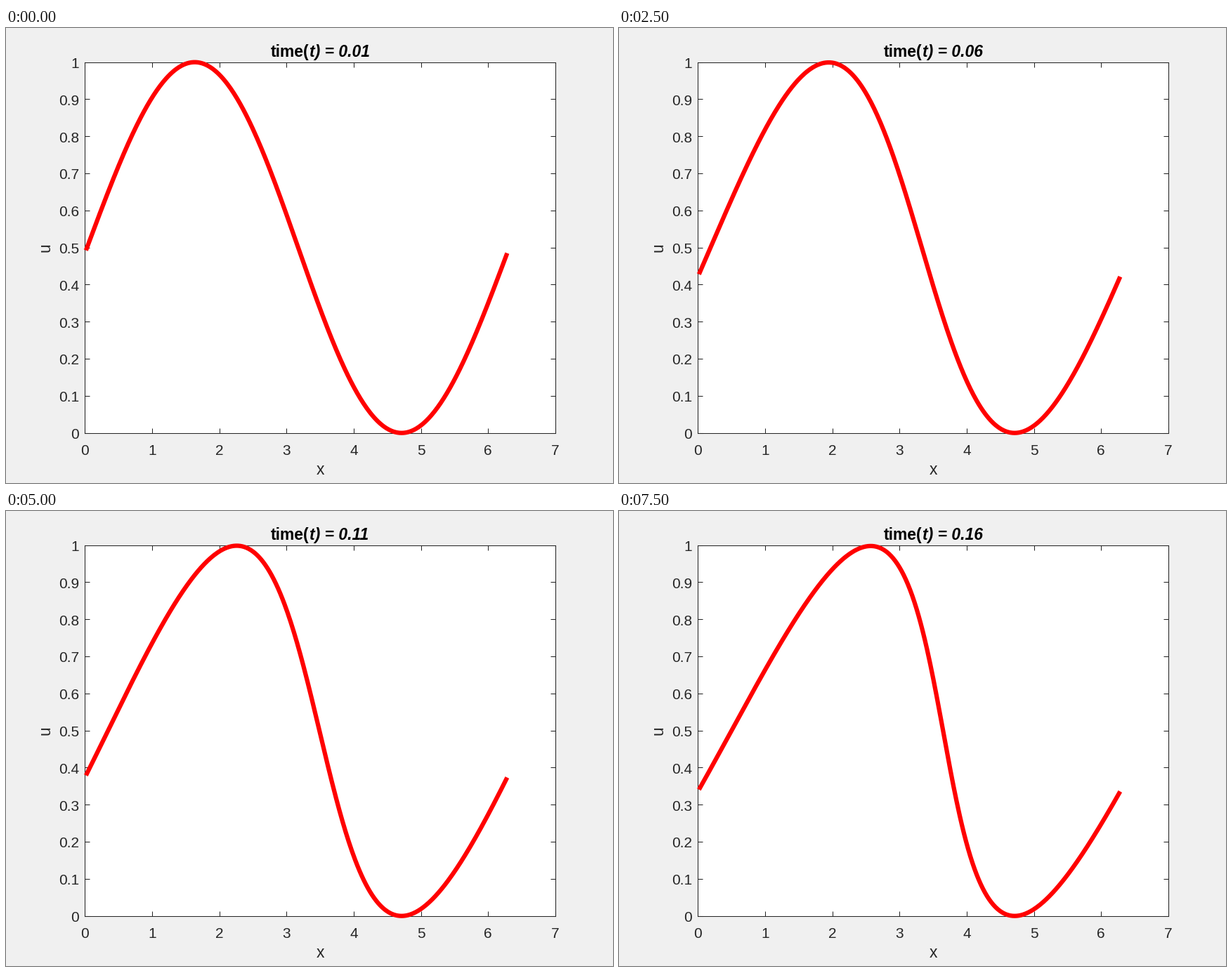
Animation, 864 px wide and 648 px high, one loop 8000 ms. Source, as a matplotlib script:

```python
import numpy as np
import matplotlib.pyplot as plt
from matplotlib.animation import FuncAnimation

W, H, DPI = 864, 648, 150
FRAMES, INTERVAL = 16, 500
N, DT, STEPS = 400, 0.001, 10
INK = "#262626"
TICK_PT, LABEL_PT = 10, 11
LABEL_PX = LABEL_PT * DPI / 72
DIGIT = 0.556  # digit advance in em

plt.rcParams["font.family"] = "Liberation Sans"


def solve():
    """Upwind solution of u_t + 2*pi*u*u_x = 0 on a periodic domain."""
    h = 2 * np.pi / N
    x = h * np.arange(1, N + 1)
    u = (1 + np.sin(x)) / 2
    states = []
    for _ in range(FRAMES):
        for _ in range(STEPS):
            flux = np.pi * u ** 2
            u = u - DT / h * (flux - np.roll(flux, 1))
        states.append(u)
    return x, states


def write(x, y, s, size=TICK_PT, color=INK, **kw):
    """Text whose baseline starts at a pixel position, y measured downwards."""
    return fig.text(x / W, 1 - y / H, s, size=size, color=color,
                    ha="left", va="baseline", **kw)


fig = plt.figure(figsize=(W / DPI, H / DPI), dpi=DPI, facecolor="#f0f0f0")
ax = fig.add_axes([0.13, 0.11, 0.775, 0.815])
ax.set(xlim=(0, 7), ylim=(0, 1), xticks=range(8), yticks=np.linspace(0, 1, 11))
ax.tick_params(direction="in", length=3.2, width=0.5, color=INK, top=True,
               right=True, labelbottom=False, labelleft=False)
for spine in ax.spines.values():
    spine.set(linewidth=0.5, edgecolor=INK)

left, right = 0.13 * W, 0.905 * W
top, bottom = 0.075 * H, 0.89 * H
mid = (left + right) / 2

for k in range(8):
    write(left + (right - left) * k / 7 - 5.8, 607.5, str(k))
for k in range(11):
    write(92.4 if k % 10 == 0 else 75,
          bottom - (bottom - top) * k / 10 + 8.4, f"{k / 10:g}")
write(mid - 0.25 * LABEL_PX, 636, "x", LABEL_PT)
write(63, 313 + DIGIT / 2 * LABEL_PX, "u", LABEL_PT,
      rotation=90, rotation_mode="anchor")

bold = dict(size=LABEL_PT, color="black", weight="bold")
head = write(0, 41, "time(", **bold)
tail = write(0, 41, "", style="italic", **bold)

x, states = solve()
curve, = ax.plot([], [], color="red", lw=3, solid_capstyle="butt",
                 solid_joinstyle="round", clip_on=False, zorder=5)


def update(i):
    value = f"{(i + 1) / 100:g}"
    head_em = 2.389
    tail_em = 2.084 + DIGIT * (len(value) - 1)
    start = mid - (head_em + tail_em) / 2 * LABEL_PX
    head.set_x(start / W)
    tail.set_x((start + head_em * LABEL_PX) / W)
    tail.set_text(f"t) = {value}")
    curve.set_data(x, states[i])
    return curve, head, tail


anim = FuncAnimation(fig, update, frames=FRAMES, interval=INTERVAL,
                     repeat=True, repeat_delay=0, blit=False)
plt.show()
```
